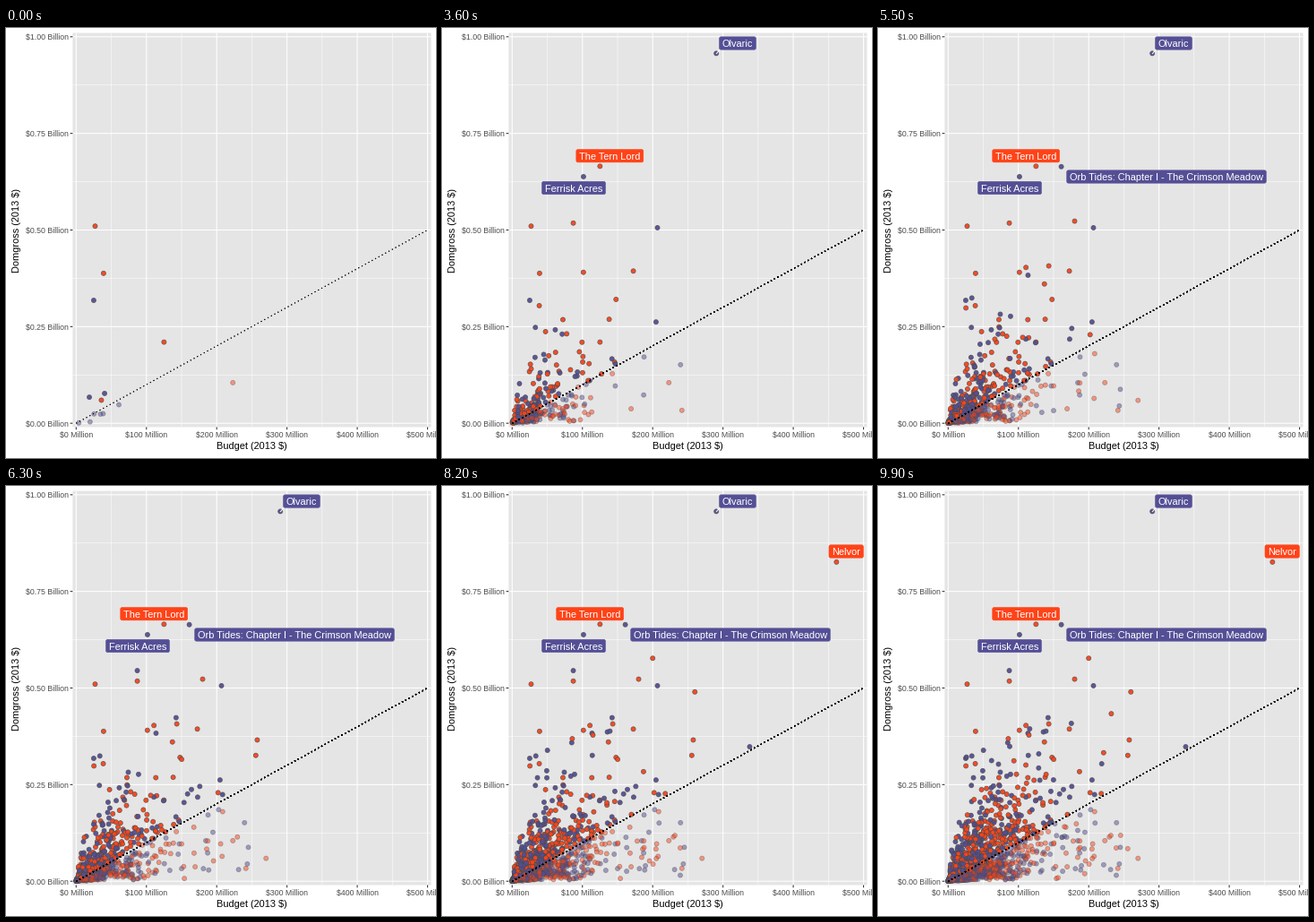
A matplotlib script that plays this animation: 480 by 480 pixels, repeating every 10 s.

```python
import numpy as np
import matplotlib.pyplot as plt
from matplotlib.animation import FuncAnimation
from matplotlib.colors import to_rgba
from matplotlib.patches import FancyBboxPatch, Rectangle

PX = 0.9  # points per pixel at 80 dpi
ORANGE, PURPLE = "#FF4318", "#544F95"
FRAMES = 100
FILMS = 1580
# Frames on which new films come in; sparse at first, then every frame.
ACTIVE = np.array([0, 3, 4, 8, 9, *range(13, 20), 23, 24, 27, 28, 29,
                   *range(31, FRAMES)])

plt.rcParams["font.family"] = "Liberation Sans"
rng = np.random.default_rng(7)
fig = plt.figure(figsize=(6, 6), dpi=80, facecolor="white")
ax = fig.add_axes([0, 0, 1, 1])
ax.set(xlim=(0, 480), ylim=(480, 0))
ax.axis("off")


def budget_x(millions):
    return 78.3 + 0.7845 * millions


def gross_y(billions):
    return 441.2 - 431.4 * billions


def segment(xs, ys, color, width):
    ax.plot(xs, ys, color=color, lw=width * PX, zorder=1, snap=False,
            solid_capstyle="butt")


def draw_axes():
    left, right, top, bottom = 74.4, 474.5, 5.5, 445.5
    ax.add_patch(Rectangle((left, top), right - left, bottom - top,
                           fc="#E5E5E5", ec="none", zorder=0, snap=False))
    for minor in (True, False):
        width = 0.53 if minor else 1.07
        for i in range(minor, 11, 2):
            segment([budget_x(50 * i)] * 2, [top, bottom], "white", width)
        for i in range(minor, 9, 2):
            segment([left, right], [gross_y(i / 8)] * 2, "white", width)
    small = dict(fontsize=8.8 * PX, color="#4D4D4D", va="baseline")
    for i in range(6):
        x = budget_x(100 * i)
        segment([x, x], [bottom, bottom + 2.8], "#333333", 1.07)
        ax.text(x, 457, f"\\${100 * i} Million", ha="center", **small)
    for i in range(5):
        y = gross_y(i / 4)
        segment([left - 2.8, left], [y, y], "#333333", 1.07)
        ax.text(70.3, y + 3.4, f"\\${i / 4:.2f} Billion", ha="right", **small)
    title = dict(fontsize=11 * PX)
    ax.text(274.5, 470, "Budget (2013 \\$)", ha="center", va="baseline", **title)
    ax.text(17, 226, "Domgross (2013 \\$)", rotation=90, ha="right", va="center", **title)


def make_films():
    """Seeded films as arrays: first frame, budget, gross, is purple."""
    budget = rng.gamma(1.05, 50, 2 * FILMS)
    luck = rng.normal(0, 0.85, budget.size)
    luck[luck < 0] *= 1.3
    gross = 0.055 * (budget / 50) ** 0.8 * np.exp(luck)
    kept = (gross < 0.3 + 0.001 * budget) & (budget < 285)
    budget, gross = budget[kept][:FILMS], gross[kept][:FILMS]
    purple = rng.random(FILMS) < np.where(budget < 50, 0.6, 0.42)
    order = np.maximum(np.arange(FILMS) - 8, 0) / FILMS
    start = ACTIVE[np.searchsorted(ACTIVE, (FRAMES - 1) * order ** (1 / 1.6))]
    return np.column_stack([start, budget, gross, purple])


class Label:
    def __init__(self, name, color, x, y, shown, pointer=None):
        self.shown = shown
        text = ax.text(x, y + 4.2, name, color="white", fontsize=11 * PX,
                       ha="center", va="baseline", zorder=9)
        width = text.get_window_extent(fig.canvas.get_renderer()).width + 4.2
        box = FancyBboxPatch((x - width / 2, y - 6), width, 12, fc=color, ec=color,
                             lw=0.5 * PX, zorder=8,
                             boxstyle="round,pad=1.2,rounding_size=2")
        ax.add_patch(box)
        self.parts = [text, box]
        if pointer:
            self.parts += ax.plot(*zip(*pointer), color="white", lw=PX, zorder=7)

    def update(self, frame):
        for part in self.parts:
            part.set_visible(bool(self.shown(frame)))


def label_below(frame):
    return frame % 9 in (7, 8)


draw_axes()
labels = [
    Label("Ferrisk Acres", PURPLE, 147, 178.5, lambda f: f >= 14),
    Label("The Tern Lord", ORANGE, 187.3, 142.7, lambda f: 18 <= f < 43),
    Label("The Tern Lord", ORANGE, 165.2, 142.7, lambda f: f >= 43),
    Label("Olvaric", PURPLE, 330, 17, lambda f: f >= 33 and not label_below(f),
          [(306.5, 28.5), (310, 24.5)]),
    Label("Olvaric", PURPLE, 295, 41.2, lambda f: f >= 33 and label_below(f)),
    Label("Orb Tides: Chapter I - The Crimson Meadow", PURPLE, 322, 166,
          lambda f: f >= 43),
    Label("Nelvor", ORANGE, 451.2, 73, lambda f: f >= 79),
]

# Films that stand clear of the crowd, the labelled ones first.
notable = [(14, 101.5, 0.638, 1), (18, 125, 0.665, 0), (33, 290.5, 0.957, 1),
           (43, 161, 0.664, 1), (79, 461.5, 0.826, 0),
           (0, 27, 0.51, 0), (0, 39, 0.388, 0), (0, 25, 0.318, 1),
           (0, 125, 0.21, 0), (0, 223, 0.105, 0), (24, 87, 0.518, 0),
           (50, 180, 0.523, 0), (60, 87, 0.545, 1), (64, 260, 0.49, 0),
           (68, 338, 0.348, 1), (76, 200, 0.577, 0)]
films = np.vstack([notable, make_films()])
starts, budgets, grosses, purple = films[np.argsort(films[:, 0], kind="stable")].T
places = np.column_stack([budget_x(budgets), gross_y(grosses)])
lost_money = grosses < budgets / 1000
faces = np.where(purple[:, None] == 1, to_rgba(PURPLE), to_rgba(ORANGE))
edges = np.tile(to_rgba("#4A4A4A"), (len(places), 1))
faces[:, 3] = np.where(lost_money, 0.5, 0.95)
edges[:, 3] = 0.85 * faces[:, 3]

dots = ax.scatter([], [], s=(5.1 * PX) ** 2, linewidths=0.75 * PX, zorder=3)
# Stacked copies of the dotted line make it bolder with time.
diagonal = [ax.plot([budget_x(0), budget_x(500)], [gross_y(0), gross_y(0.5)],
                    color="black", lw=1.07 * PX, ls=(0, (1, 3)),
                    dash_capstyle="butt", zorder=5)[0] for _ in range(24)]


def update(frame):
    count = np.searchsorted(starts, frame, side="right")
    dots.set_offsets(places[:count])
    dots.set_facecolors(faces[:count])
    dots.set_edgecolors(edges[:count])
    for i, line in enumerate(diagonal):
        line.set_visible(i < 2 + 2 * ((frame + 2) // 5))
    for label in labels:
        label.update(frame)
    return [dots]


animation = FuncAnimation(fig, update, frames=FRAMES, interval=100,
                          repeat=True, repeat_delay=0, blit=False)
plt.show()
```
